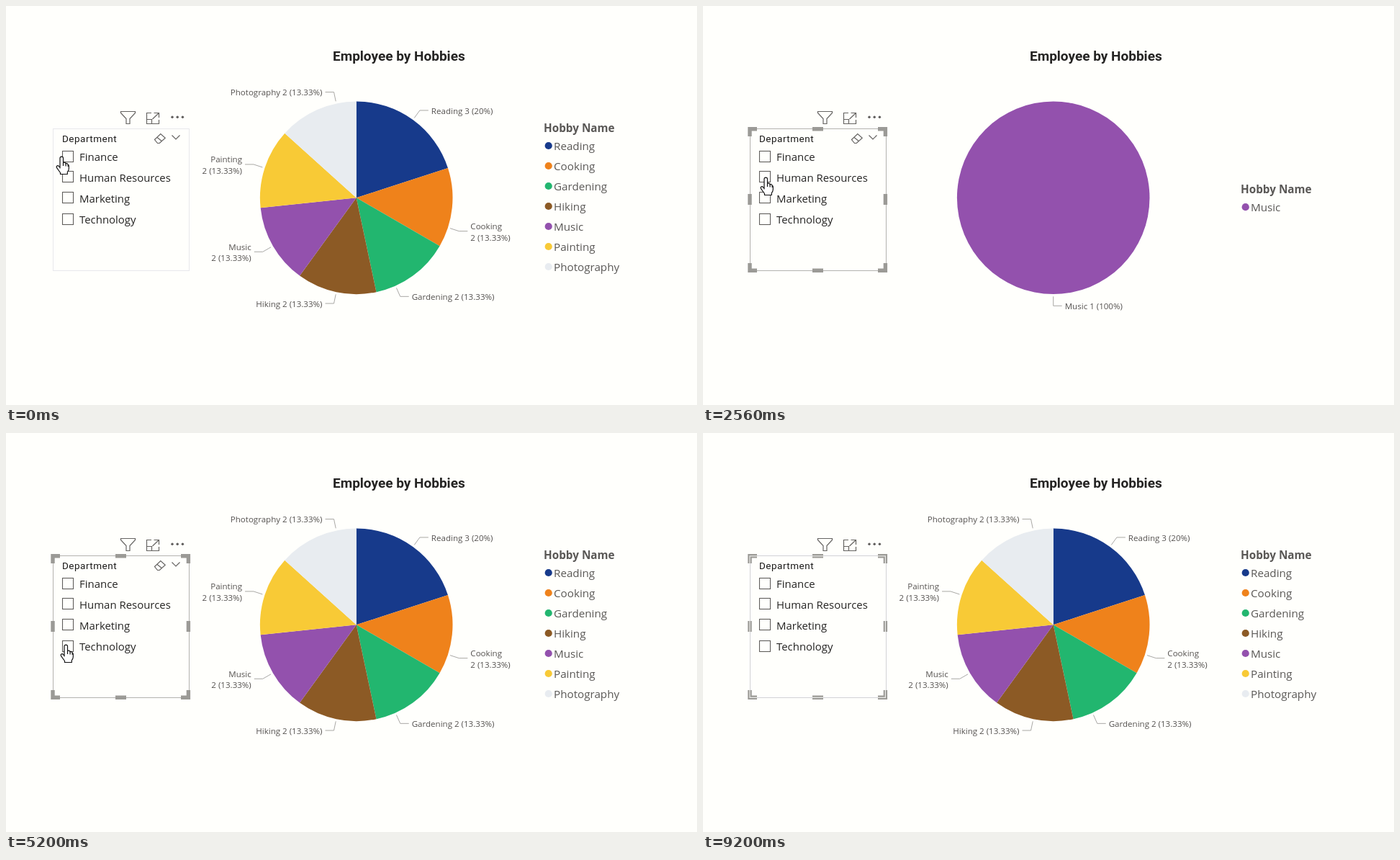
An HTML page for the animation above (9.28 s loop, 960x554 px).

```html
<!DOCTYPE html>
<html lang="en">
<head>
<meta charset="utf-8">
<title>Employee by Hobbies</title>
<style>
  html, body { margin: 0; width: 100%; height: 100%; overflow: hidden; background: #fffffc; }
  svg { display: block; width: 100vw; height: 100vh; font-family: "Open Sans", "Noto Sans", sans-serif; }
  .title { font: 700 19px Roboto, sans-serif; fill: #252423; }
  .header { font: 400 13.5px Roboto, sans-serif; letter-spacing: .5px; fill: #1c1b1a; }
  .option { font-size: 14.95px; fill: #252423; }
  .label { font-size: 11.55px; fill: #555250; }
  .legend { font-size: 15.2px; fill: #5a5856; }
  .legend.head { font-size: 15.3px; font-weight: 700; }
  .leader { fill: none; stroke: #a9a8a5; }
  .icon { fill: none; stroke: #666462; stroke-width: 1.2; }
  .box { fill: #fffffc; stroke: #605e5c; stroke-width: 1.1; }
  .tip { font-size: 14.4px; fill: #252423; }
</style>
</head>
<body>
<svg id="stage" viewBox="0 0 960 554" preserveAspectRatio="none">
  <text class="title" x="454" y="75.5">Employee by Hobbies</text>
  <g id="charts"></g>
  <circle id="loading" cx="236.3" cy="77" r="1.7" fill="#666"/>

  <g class="icon">
    <path d="M159.5 146.5H179.5V148.5L172 156.5V163.5H167V156.5L159.5 148.5Z"/>
    <path d="M202 148.5H195.5V163.5H212.5V158M205.5 148.5H212.5V155M212.5 148.5L203.5 157M195.5 157.5H202.5V163.5"/>
    <g fill="#605e5c" stroke="none">
      <circle cx="231" cy="154.3" r="1.7"/><circle cx="238.2" cy="154.3" r="1.7"/><circle cx="245.4" cy="154.3" r="1.7"/>
    </g>
  </g>

  <rect id="frame" x="65.5" y="170.5" width="189" height="197" fill="#fffffc"/>
  <g id="handles" fill="none" stroke="#9b9a96" stroke-width="5.4"></g>
  <text class="header" x="78" y="189">Department</text>
  <g id="tools" class="icon">
    <path d="M206.5 185.5L214.8 177.5L221.2 183.3L213.3 190.5H210.5ZM209.8 182.3L216.5 187.8"/>
    <path d="M230.5 179.5L236 185L241.5 179.5"/>
  </g>
  <g id="options"></g>

  <g id="tooltip">
    <rect y=".5" height="31" fill="#fffffc" stroke="#252423" stroke-width="1.2"/>
    <text class="tip" x="10" y="21"></text>
  </g>
  <g id="cursor" fill="#fff" stroke="#111" stroke-width="1.2" stroke-linejoin="round">
    <path d="M-2.5 15V1.5Q-2.5-.8-.2-.8Q2-.8 2 1.5V8Q2.2 7 3.8 7.2Q5.4 7.4 5.6 9Q6.2 8.2 7.3 8.6Q8.6 9 8.7 10.6Q9.6 10.4 9.8 12V16Q9.6 19 7.8 20.6V23.5H-2V21.5L-6.6 15.2Q-8 13-6.6 12Q-5.2 11.2-3.8 12.8L-2.5 14.2Z"/>
    <path d="M2 8V12M5.6 9V12.5M8.7 10.6V13" fill="none"/>
  </g>
</svg>
<script>
const NS = "http://www.w3.org/2000/svg";
const $ = id => document.getElementById(id);
const LOOP = 9280, STEP = 80;
const CX = 486.7, CY = 266.3, R = 133.8;

const COLORS = {
  Reading: "#173a8b", Cooking: "#ef821b", Gardening: "#22b66f", Hiking: "#8c5a25",
  Music: "#9351ad", Painting: "#f8ca36", Photography: "#e8ecf0"
};

// Each slice: hobby, count, label shift as a fraction of its sweep
const DATA = {
  all: [["Reading", 3, 0], ["Cooking", 2, .25], ["Gardening", 2, .25], ["Hiking", 2, 0],
        ["Music", 2, 0], ["Painting", 2, 0], ["Photography", 2, .25]],
  Finance: [["Cooking", 1, 0], ["Gardening", 1, 0], ["Reading", 1, 0]],
  "Human Resources": [["Music", 1, 0]],
  Marketing: [["Painting", 1, .25], ["Photography", 1, 0]],
  Technology: [["Hiking", 2, 0], ["Reading", 2, .25], ["Cooking", 1, 0], ["Gardening", 1, -.25],
               ["Music", 1, -.25], ["Painting", 1, 0], ["Photography", 1, .25]]
};
const DEPARTMENTS = Object.keys(DATA).slice(1);

function add(parent, tag, attrs, text) {
  const node = document.createElementNS(NS, tag);
  for (const key in attrs) node.setAttribute(key, attrs[key]);
  if (text) node.textContent = text;
  return parent.appendChild(node);
}

function polar(radius, degrees) {
  const a = degrees * Math.PI / 180;
  return [CX + radius * Math.sin(a), CY - radius * Math.cos(a)];
}

function drawLabel(group, name, value, angle) {
  const sine = Math.sin(angle * Math.PI / 180), side = sine >= 0 ? 1 : -1;
  const [x, y] = polar(150, angle);
  add(group, "path", { class: "leader", d: `M${polar(137, angle)}L${x} ${y}h${side * 12}` });
  const write = (text, dy) => add(group, "text", {
    class: "label", x: x + side * 16, y: y + dy, "text-anchor": side > 0 ? "start" : "end"
  }, text);
  if (Math.abs(sine) > .8) {
    write(name, -2.7);
    write(value, 13);
  } else {
    write(`${name} ${value}`, 4.6);
  }
}

function drawChart(key) {
  const rows = DATA[key], group = add($("charts"), "g", {});
  const total = rows.reduce((sum, row) => sum + row[1], 0);
  const top = 169 + 14.2 * (7 - rows.length);
  let start = 0;
  add(group, "text", { class: "legend head", x: 747, y: top + 6 }, "Hobby Name");
  rows.forEach(([name, count, shift], i) => {
    const sweep = count / total * 360, end = start + sweep, fill = COLORS[name];
    if (sweep === 360) add(group, "circle", { cx: CX, cy: CY, r: R, fill });
    else add(group, "path", {
      fill, d: `M${CX} ${CY}L${polar(R, start)}A${R} ${R} 0 ${+(sweep > 180)} 1 ${polar(R, end)}Z`
    });
    const percent = +(100 * count / total).toFixed(2);
    drawLabel(group, name, `${count} (${percent}%)`, start + sweep * (.5 + shift));
    const y = top + 25.2 + 28 * i;
    add(group, "circle", { cx: 753.7, cy: y - .2, r: 5.1, fill });
    add(group, "text", { class: "legend", x: 761, y: y + 6 }, name);
    start = end;
  });
  return group;
}

const charts = Object.fromEntries(Object.keys(DATA).map(key => [key, drawChart(key)]));

const BOX_TOPS = [201.5, 229.5, 258.5, 288.5];
const boxes = DEPARTMENTS.map((name, i) => {
  add($("options"), "text", { class: "option", x: 102, y: 215 + 29.1 * i }, name);
  return add($("options"), "rect", { class: "box", x: 78.5, y: BOX_TOPS[i], width: 15, height: 15 });
});

const HANDLES = "M65 181V170.8H75M243 170.8H253.4V181M253.4 357V367.3H243M75 367.3H65V357" +
  "M152 170.8H167M152 367.3H167M65 261V276M253.4 261V276";
add($("handles"), "path", { d: HANDLES });
const lining = add($("handles"), "path", { d: HANDLES, stroke: "#e9e9e6", "stroke-width": 1.2 });

// Stepped tracks: [from ms, value]
const CHECKED = [[0, ""], [240, "Finance"], [1200, ""], [1760, "Human Resources"], [2480, ""],
  [2960, "Marketing"], [4480, ""], [5360, "Technology"], [8800, ""]];
const SHOWN = [[0, "all"], [480, "Finance"], [1360, "all"], [1920, "Human Resources"], [2640, "all"],
  [3200, "Marketing"], [4640, "all"], [5600, "Technology"], [8960, "all"]];
const TIPS = [[0, ""], [3920, "Marketing"], [4400, ""], [6880, "Technology"], [8720, ""]];
// Pointer path: [ms, x, y]
const PATH = [[0, 77.5, 210], [1360, 77.5, 210], [1680, 87.5, 239], [2640, 87.5, 239], [2960, 89, 259],
  [3040, 89, 259], [3280, 88.5, 264], [4720, 88.5, 264], [5200, 83.5, 295], [8880, 83.5, 295], [9120, 60, 330]];

const valueAt = (track, t) => track.filter(([from]) => from <= t).pop()[1];

function pointAt(t) {
  const next = PATH.findIndex(([time]) => time > t);
  if (next < 0) return PATH[PATH.length - 1].slice(1);
  const [t0, x0, y0] = PATH[next - 1], [t1, x1, y1] = PATH[next];
  const k = (t - t0) / (t1 - t0);
  return [x0 + (x1 - x0) * k, y0 + (y1 - y0) * k];
}

function show(node, visible) {
  node.setAttribute("visibility", visible ? "visible" : "hidden");
}

function render(now) {
  const t = Math.floor(now % LOOP / STEP) * STEP;
  const checked = valueAt(CHECKED, t), shown = valueAt(SHOWN, t), tip = valueAt(TIPS, t);
  const selected = t >= 240, hovered = t < 9120;
  const [x, y] = pointAt(t);

  for (const key in charts) show(charts[key], key === shown);
  boxes.forEach((box, i) => { box.style.fill = DEPARTMENTS[i] === checked ? "#42403e" : ""; });
  show($("loading"), checked && shown === "all");
  show($("handles"), selected);
  show($("tools"), hovered);
  show($("cursor"), hovered);
  lining.style.display = hovered ? "none" : "";
  $("frame").setAttribute("stroke", !selected ? "#e8e8ec" : hovered ? "#b3b2af" : "#d2d2d6");
  $("cursor").setAttribute("transform", `translate(${x} ${y})`);

  show($("tooltip"), tip);
  if (tip) {
    const [rect, text] = $("tooltip").children;
    text.textContent = tip;
    rect.setAttribute("width", Math.round(text.getComputedTextLength() + 20));
    $("tooltip").setAttribute("transform", `translate(${x + 10} ${y + 18})`);
  }
}

const begin = performance.now();
(function tick() {
  render(performance.now() - begin);
  requestAnimationFrame(tick);
})();
</script>
</body>
</html>
```
